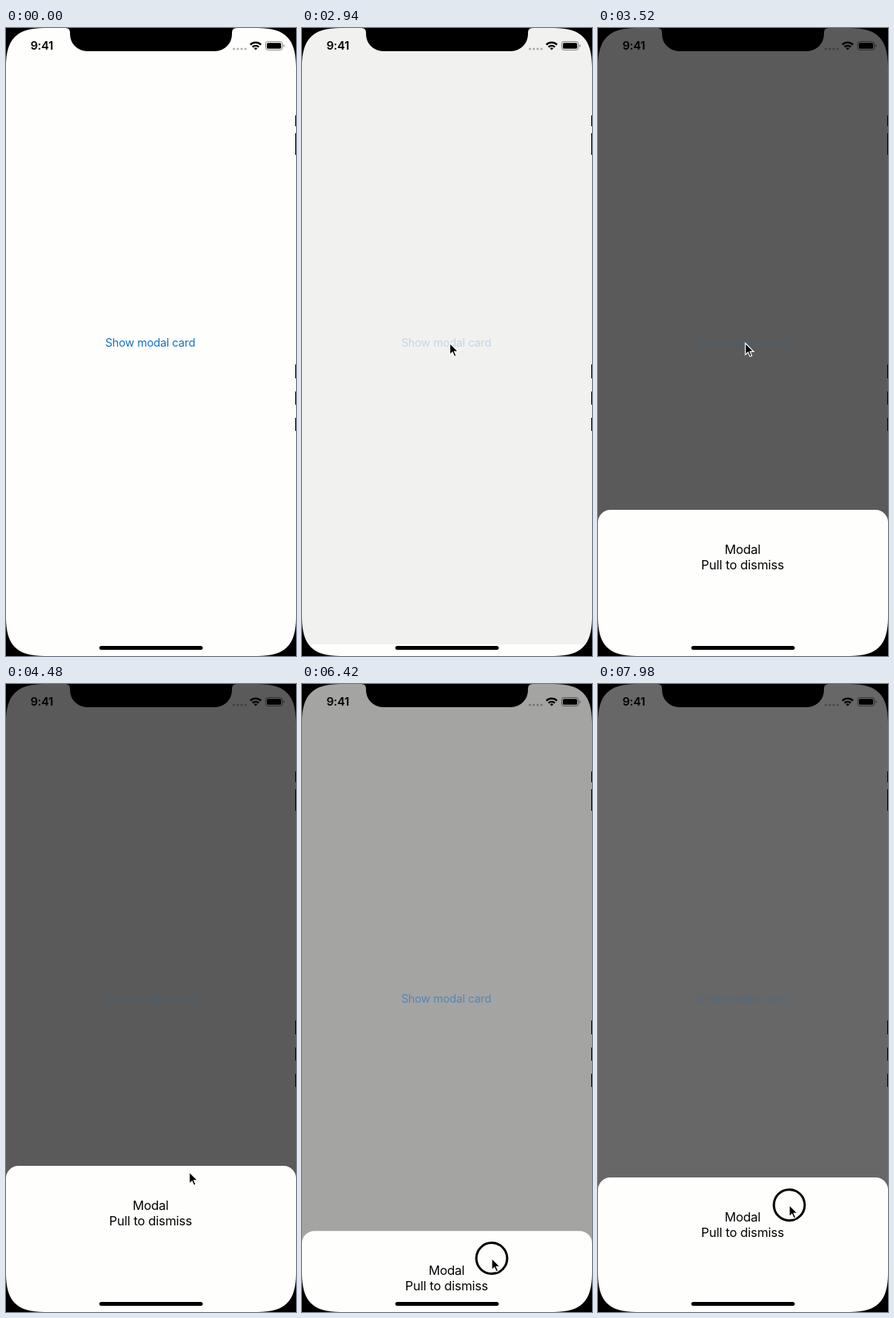
An HTML page for the animation above (8 s loop, 376x812 px).

```html
<!DOCTYPE html>
<html lang="en">
<head>
<meta charset="utf-8">
<title>Modal card</title>
<style>
  html, body { margin: 0; width: 100%; height: 100%; overflow: hidden; background: #000; }
  svg { display: block; width: 100%; height: 100%; font-family: Inter, Roboto, sans-serif; }
  text { text-anchor: middle; letter-spacing: -.01em; }
</style>
</head>
<body>
<svg viewBox="0 0 376 812">
  <rect width="376" height="812" fill="#fefefd"/>
  <rect id="dim" width="376" height="812"/>
  <text id="link" x="187" y="411.5" font-size="14.5" fill="#1272c4">Show modal card</text>

  <text x="46.5" y="28.2" font-size="15" font-weight="600">9:41</text>
  <path d="M295.5 27H312" stroke="#000" stroke-opacity=".3" stroke-width="3" stroke-linecap="round" stroke-dasharray="0 5"/>
  <g fill="none" stroke="#000" stroke-width="2.4">
    <path d="M316.8 21.6a9.8 9.8 0 0 1 13.8 0"/>
    <path d="M319.6 24.6a5.8 5.8 0 0 1 8.2 0"/>
  </g>
  <path d="M323.7 28.6l-2.2-2.4a3.2 3.2 0 0 1 4.4 0z"/>
  <rect x="336.5" y="17.5" width="22" height="11" rx="3" fill="none" stroke="#000" stroke-opacity=".45"/>
  <rect x="338.2" y="19.2" width="18.6" height="7.6" rx="1.6"/>
  <path d="M359.8 21v4q1.4-.6 1.4-2t-1.4-2z" opacity=".45"/>

  <g id="card">
    <rect width="376" height="240" rx="16" fill="#fefefd"/>
    <g font-size="16.3">
      <text x="187.5" y="56.5">Modal</text>
      <text x="187.5" y="76.5">Pull to dismiss</text>
    </g>
  </g>

  <!-- bezel: screen outline with notch cut out of black -->
  <path fill-rule="evenodd" d="M0 0H376V812H0z M0 50C0 14 14 0 50 0H77Q83 0 83 6V8A22 22 0 0 0 105 30H271A22 22 0 0 0 293 8V6Q293 0 299 0H326C362 0 376 14 376 50V762C376 798 362 812 326 812H50C14 812 0 798 0 762z"/>
  <path d="M375.5 113v14m0 9v28M375.5 435v18m0 17v17m0 17v17" stroke="#000"/>
  <rect x="121" y="799" width="134" height="5" rx="2.5"/>

  <g id="pointer">
    <circle id="ring" r="20" fill="none" stroke="#000" stroke-width="3"/>
    <path d="M0 0V15L3.5 11.8L5.9 17.3L8.4 16.2L6 10.8H10.8z" stroke="#fff" stroke-width="1.2"/>
  </g>
</svg>
<script>
const LOOP = 8000, HEIGHT = 812, OPEN_TOP = 623;
const TAP = 2560, OPEN = 2920, GRAB = 5340, GRAB_Y = 666, LAG = 42;
const $ = id => document.getElementById(id);

const span = (t, from, to) => Math.min(1, Math.max(0, (t - from) / (to - from)));
const smooth = (t, from, to) => { const u = span(t, from, to); return u * u * (3 - 2 * u); };

// Pointer stops: time, x, y
const stops = [
  [900, 382, 590], [1600, 193, 407.5], [3750, 191, 407.5], [4700, 245, GRAB_Y], [GRAB, 245, GRAB_Y],
  [6127, 246, 775], [6941, 246, GRAB_Y], [7480, 248, 750], [8180, 248, 655]
];

function pointerAt(t) {
  let [, x, y] = stops[0];
  for (let i = 1; i < stops.length; i++) {
    const s = smooth(t, stops[i - 1][0], stops[i][0]);
    x += (stops[i][1] - x) * s;
    y += (stops[i][2] - y) * s;
  }
  return [x, y];
}

// The card slides in, then follows the pointer a little late
function cardTop(t) {
  const away = (1 - span(t, OPEN, OPEN + 520)) ** 2;
  const drag = t > GRAB + LAG ? pointerAt(t - LAG)[1] - GRAB_Y : 0;
  return OPEN_TOP + (HEIGHT - OPEN_TOP) * away + drag;
}

function draw(t) {
  const [x, y] = pointerAt(t), top = cardTop(t);
  const shown = span(top, HEIGHT, OPEN_TOP);
  const press = smooth(t, TAP, TAP + 90) - smooth(t, 2900, 3350);
  const held = (t > TAP && t < 2880) || t > 5200;

  $('dim').setAttribute('opacity', .645 * shown);
  $('link').setAttribute('opacity', (1 - .8 * shown) * (1 - .8 * press));
  $('card').setAttribute('transform', `translate(0 ${top})`);
  $('pointer').setAttribute('transform', `translate(${x} ${y})`);
  $('ring').setAttribute('opacity', held ? 1 : 0);
  $('pointer').setAttribute('opacity', t < stops[0][0] ? 0 : 1);
}

const start = performance.now();
function frame() {
  draw((performance.now() - start) % LOOP);
  requestAnimationFrame(frame);
}
frame();
</script>
</body>
</html>
```
